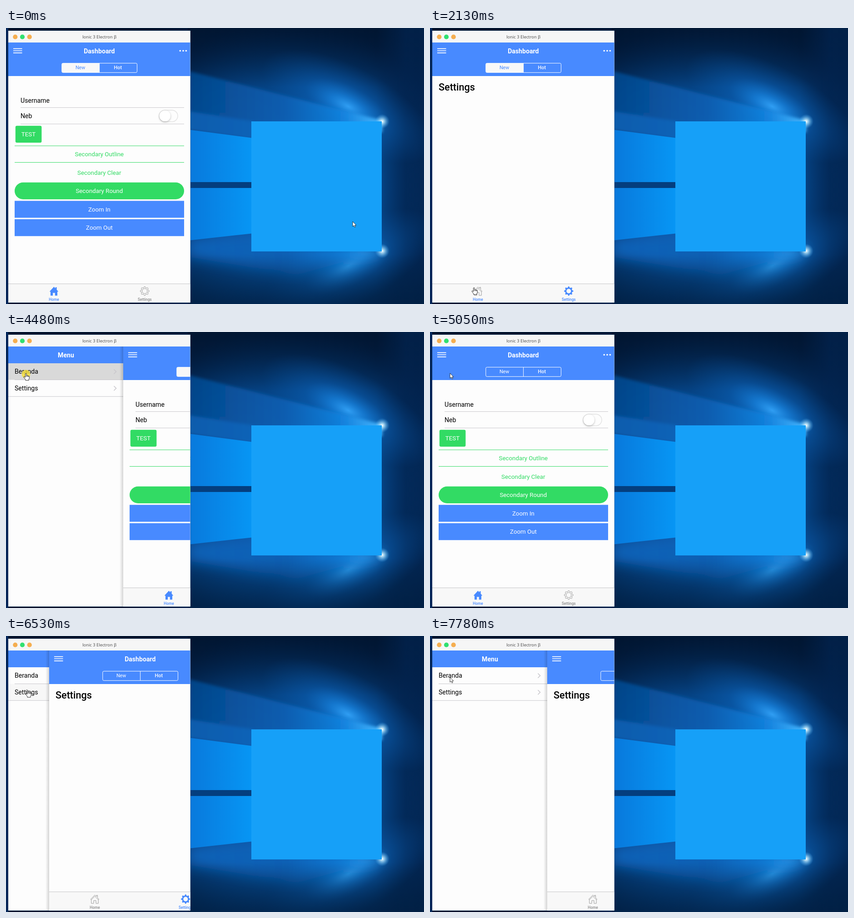
These frames come from a looping animation (920 by 609 pixels, 8000 ms). An HTML page:

```html
<!DOCTYPE html>
<html lang="en">
<head>
<meta charset="utf-8">
<title>Dashboard demo</title>
<style>
html, body { margin: 0; width: 100%; height: 100%; overflow: hidden; background: #001a38; }
svg { display: block; width: 100vw; height: 100vh; }
text { font: 14.1px Roboto, sans-serif; fill: #000; white-space: pre; }
.mid { text-anchor: middle; }
.title { font-weight: 700; fill: #fff; }
.btn { font-size: 13.3px; fill: #fff; text-anchor: middle; }
.seg { font-size: 10.8px; text-anchor: middle; }
.tab { font-size: 8.3px; font-weight: 500; text-anchor: middle; }
.win { font: 9.4px "Open Sans", "Noto Sans", sans-serif; fill: #444; text-anchor: middle; }
</style>
</head>
<body>
<svg id="stage" viewBox="0 0 920 609" preserveAspectRatio="none"></svg>
<script>
const BLUE = '#488aff', GREEN = '#32db64', LINE = '#c8c7cc', GREY = '#8c8c8c';
const LOOP = 8000, MENU_W = 253;

const rect = (x, y, w, h, fill, extra = '') =>
  `<rect x="${x}" y="${y}" width="${w}" height="${h}" fill="${fill}" ${extra}/>`;
const text = (x, y, s, cls = '', extra = '') => `<text x="${x}" y="${y}" class="${cls}" ${extra}>${s}</text>`;
const line = (d, stroke, w = 1, extra = '') =>
  `<path d="${d}" fill="none" stroke="${stroke}" stroke-width="${w}" ${extra}/>`;
const poly = (points, fill, extra = '') => `<polygon points="${points}" fill="${fill}" ${extra}/>`;
const stops = list => list.map(([o, c, a = 1]) =>
  `<stop offset="${o}" stop-color="${c}" stop-opacity="${a}"/>`).join('');
const linear = (id, x1, y1, x2, y2, list) =>
  `<linearGradient id="${id}" gradientUnits="userSpaceOnUse" x1="${x1}" y1="${y1}" x2="${x2}" y2="${y2}">${stops(list)}</linearGradient>`;
const radial = (id, cx, cy, r, list) =>
  `<radialGradient id="${id}" gradientUnits="userSpaceOnUse" cx="${cx}" cy="${cy}" r="${r}">${stops(list)}</radialGradient>`;

function gear(cx, cy, teeth, inner, outer) {
  const pts = [];
  for (let i = 0; i < teeth * 4; i++) {
    const a = (i - 1.5) / (teeth * 4) * 2 * Math.PI - Math.PI / 2;
    const r = i % 4 === 1 || i % 4 === 2 ? outer : inner;
    pts.push((cx + r * Math.cos(a)).toFixed(2) + ' ' + (cy + r * Math.sin(a)).toFixed(2));
  }
  return 'M' + pts.join('L') + 'Z';
}

const ring = (cx, cy, r) => `M${cx - r} ${cy}a${r} ${r} 0 1 0 ${2 * r} 0a${r} ${r} 0 1 0 ${-2 * r} 0Z`;

const defs = `<defs>
  ${radial('sky', 620, 350, 460, [[0, '#0764be'], [.4, '#064c94'], [.6, '#04376f'], [.8, '#021f45'], [1, '#01142d']])}
  ${linear('upper', 400, 0, 828, 0, [[0, '#074a92', .8], [.5, '#0a60b4', .85], [.8, '#1484e0', .9], [1, '#48b8ff']])}
  ${linear('lower', 400, 0, 828, 0, [[0, '#0a68c2', .85], [.5, '#0862b8', .8], [.8, '#1080dc', .85], [1, '#48b8ff']])}
  ${linear('beam', 405, 0, 550, 0, [[0, '#0879dc'], [1, '#0798f6']])}
  ${linear('right', 815, 0, 880, 0, [[0, '#022450', 0], [1, '#022450', .75]])}
  ${linear('top', 0, 0, 0, 130, [[0, '#01142e', .8], [1, '#01142e', 0]])}
  ${linear('low', 0, 500, 0, 609, [[0, '#01203f', 0], [1, '#011f42', .7]])}
  ${radial('glow', 0, 0, 210, [[0, '#34a8ff', .9], [.2, '#1a8cec', .7], [.5, '#0e6cc8', .35], [1, '#0a58a8', 0]])}
  ${radial('spark', 0, 0, 16, [[0, '#fff'], [.25, '#c8f0ff', .8], [1, '#50b8ff', 0]])}
  <filter id="soft" x="-10%" y="-10%" width="120%" height="120%"><feGaussianBlur stdDeviation="3"/></filter>
  <filter id="blur" x="-20%" y="-20%" width="140%" height="140%"><feGaussianBlur stdDeviation="14"/></filter>
  <filter id="shade" x="-30%" y="-30%" width="160%" height="170%"><feDropShadow dx="0" dy="1.5" stdDeviation="2" flood-opacity=".28"/></filter>
  ${linear('edge', -3, 0, 5, 0, [[0, '#000', 0], [1, '#000', .16]])}
  <clipPath id="view"><rect x="5" y="32" width="400.5" height="573.5"/></clipPath>
</defs>`;

const glow = (x, y, turn) =>
  `<circle r="210" fill="url(#glow)" transform="translate(${x} ${y}) rotate(${turn}) translate(-70) scale(1 .42)"/>`;

const wallpaper = rect(0, 0, 920, 609, 'url(#sky)') +
  rect(400, 0, 520, 130, 'url(#top)') +
  rect(815, 0, 105, 609, 'url(#right)') +
  glow(815, 206, 28) + glow(815, 492, -28) +
  `<g filter="url(#blur)">` +
  poly('400,465 545,450 828,492 640,545 400,505', 'url(#lower)') + `</g>` +
  `<g filter="url(#soft)">` +
  poly('390,92 828,204 828,230 545,245 390,222', 'url(#upper)') +
  poly('390,182 545,206 545,245 390,224', '#0a6ac2', 'opacity=".6"') + `</g>` +
  poly('400,224 545,243 545,343 400,340', 'url(#beam)') +
  poly('400,353 545,351 545,453 400,469', 'url(#beam)') +
  rect(400, 340, 145, 13, '#043e7e') +
  rect(400, 500, 520, 109, 'url(#low)') +
  [206, 492].map(y => `<circle r="16" fill="url(#spark)" transform="translate(828 ${y})"/>`).join('') +
  rect(540, 206, 287, 287, '#16a0f8');

const frame = rect(0, 0, 5, 609, '#03265a') + rect(4, 5, 402.5, 602, '#0a2c58', 'opacity=".5"') +
  rect(5, 6, 400.5, 599.5, '#fdfdfd') + rect(5, 6, 400.5, 26, '#f6f6f6') +
  ['#f5ae50', '#30e070', '#f5ae50'].map((c, i) => `<circle cx="${20.3 + i * 15.7}" cy="19.7" r="5.1" fill="${c}"/>`).join('') +
  text(205.5, 23.2, 'Ionic 3 Electron β', 'win');

const menuRow = (id, y, label) => rect(5, y, 254, 36.5, '#d9d9d9', `id="${id}"`) +
  text(19, y + 23, label) + line(`M237.5 ${y + 13.5}l5 5l-5 5`, LINE, 1.6);

const menu = rect(5, 32, 254, 574, '#fdfdfd') + rect(5, 32, 254, 37, BLUE) +
  text(132, 56, 'Menu', 'title mid') +
  menuRow('rowHome', 69, 'Beranda') + menuRow('rowSettings', 105.7, 'Settings') +
  line('M19 105.5H259M5 142.3H259', LINE);

const header = rect(5, 32, 401, 74, BLUE) +
  line('M16 45.6H35.5M16 50.2H35.5M16 54.9H35.5', '#fff', 1.6) +
  [383.3, 390, 396.4].map(x => `<circle cx="${x}" cy="50.3" r="1.8" fill="#fff"/>`).join('') +
  text(205.3, 56, 'Dashboard', 'title mid') +
  rect(206, 78, 82.5, 20, '#fff', 'id="hotBg" opacity=".12"') +
  rect(123, 78, 82.8, 20, '#f8f8f8', 'id="newBg"') +
  rect(122.8, 77.7, 165.7, 20.6, 'none', 'rx="2.6" stroke="#fff"') + line('M205.6 78V98', '#fff') +
  text(163.7, 91.4, 'New', 'seg', 'id="newText"') +
  text(246.3, 91.4, 'Hot', 'seg', 'style="fill:#fff;font-weight:500"');

const zoomButton = (y, label) => rect(19, y, 373, 37.3, BLUE) + text(205.5, y + 23.4, label, 'btn');

const home = text(32, 164.5, 'Username') + text(32, 198.6, 'Neb') +
  line('M32 175.6H392M32 211.8H392', LINE) +
  rect(337, 181.4, 41, 25.4, '#fdfdfd', 'rx="12.7" stroke="#e4e4e4" stroke-width="1.6"') +
  `<circle cx="349.8" cy="194" r="12" fill="#fff" filter="url(#shade)"/>` +
  rect(20.8, 215.8, 57.6, 37.2, GREEN, 'rx="3.2"') + text(49.5, 239, 'TEST', 'btn') +
  line('M19 260H392M19 296.6H392', GREEN) +
  text(205.3, 283, 'Secondary Outline', 'btn', `style="fill:${GREEN}"`) +
  text(205.3, 323.6, 'Secondary Clear', 'btn', `style="fill:${GREEN}"`) +
  rect(19, 340.8, 373, 37.2, GREEN, 'rx="18.6"') + text(205.3, 364, 'Secondary Round', 'btn') +
  zoomButton(381.4, 'Zoom In') + zoomButton(421.9, 'Zoom Out');

const settings = text(19, 137.8, 'Settings', '', 'style="font-size:21.6px;font-weight:500"');

const houseOn = `<path fill="${BLUE}" d="M96 581.2L105.5 571L108.8 574.4V572H111.6V577.4L115 581.2L113.8 582.2L113 581.4V590.4H107.8V584.4H103.2V590.4H98V581.4L97.2 582.2Z"/>`;
const houseOff = line('M96.3 581L105.5 571.5L109 575V572.2H111.5V577.6L114.7 581L113.2 582V590H108V583.8H103V590H97.8V582ZM97.8 582L105.5 574.2L113.2 582', GREY, .85);
const gearOn = `<path fill="${BLUE}" fill-rule="evenodd" d="${gear(305.3, 580.5, 8, 7.8, 10.2)}${ring(305.3, 580.5, 5)}"/>`;
const gearOff = line(gear(305.3, 580.5, 8, 7.6, 9.8) + ring(305.3, 580.5, 5.6), GREY, .85);

const tabs = rect(5, 564.5, 401, 41.5, '#f8f8f8') + line('M5 564.5H406', '#c4c4c6') +
  `<g id="houseOn">${houseOn}</g><g id="houseOff">${houseOff}</g>` +
  `<g id="gearOn">${gearOn}</g><g id="gearOff">${gearOff}</g>` +
  text(105.5, 602, 'Home', 'tab', 'id="homeTab"') + text(305.3, 602, 'Settings', 'tab', 'id="settingsTab"');

const cursor = `<g id="cursor"><circle id="press" cx="0" cy="2" r="9.5" fill="#f7e032" opacity=".78"/>
  <path id="arrow" d="M0 0V11L2.6 8.7L4.4 12.6L6.2 11.8L4.5 8.1H7.8Z" fill="#fff" stroke="#111" stroke-width=".8"/>
  <path id="hand" d="M-1.5 1.2Q-.2 -.6 1.1 1.2V5Q2.4 4.2 3.4 5.5Q4.7 4.7 5.5 6.1Q7.3 5.7 7.3 7.6V10.4Q7.2 12.4 6 13.6V15.7H-1V13.9L-4.6 9.2Q-5.4 7.6 -3.8 7.3L-1.5 9ZM1.1 5V8M3.4 5.5V8M5.5 6.1V8.2" fill="#fff" stroke="#111" stroke-width=".9" stroke-linejoin="round"/></g>`;

document.getElementById('stage').innerHTML = defs + wallpaper + frame +
  `<g clip-path="url(#view)"><g id="menu">${menu}</g><g id="page">
    ${rect(-3, 32, 8, 574, 'url(#edge)', 'id="shadow"')}${rect(5, 32, 401, 574, '#fdfdfd')}${header}
    <g id="home">${home}</g><g id="settings">${settings}</g>${tabs}</g></g>` + cursor;

const el = {};
document.querySelectorAll('#stage [id]').forEach(n => el[n.id] = n);

// Cursor moves: start, end, x, y and an optional control point.
const moves = [
  [20, 20, 698, 316], [210, 950, 272, 582, 420, 665], [1370, 1800, 97, 572.5, 180, 578],
  [2490, 3270, 48, 48, 485, 40], [3300, 3420, 30.5, 46], [3640, 4090, 44, 91],
  [5050, 5200, 30.5, 50], [5560, 5730, 35, 95.5], [5880, 6110, 48, 119.5],
  [6850, 7030, 33, 51.5], [7560, 7780, 44, 91]
];
const hands = [[860, 2580], [3290, 3680], [4120, 4620], [5130, 6880], [6990, 7580]];
const presses = [[1050, 1120], [2060, 2130], [3350, 3430], [4380, 4510], [5360, 5450], [6190, 6290], [7380, 7440]];
const opens = [[3560, 4590], [5530, 6366], [7400, Infinity]];

const clamp = v => Math.max(0, Math.min(1, v));
const during = (list, t) => list.some(([a, b]) => t >= a && t < b);
const show = (node, on) => node.setAttribute('visibility', on ? 'inherit' : 'hidden');

function bezier(x1, y1, x2, y2, x) {
  const at = (a, b, s) => 3 * a * s * (1 - s) ** 2 + 3 * b * s * s * (1 - s) + s ** 3;
  let lo = 0, hi = 1;
  for (let i = 0; i < 20; i++) {
    const m = (lo + hi) / 2;
    if (at(x1, x2, m) < x) lo = m; else hi = m;
  }
  return at(y1, y2, (lo + hi) / 2);
}

function cursorAt(t) {
  let x = 763, y = 427;
  for (const [t0, t1, ex, ey, cx = (x + ex) / 2, cy = (y + ey) / 2] of moves) {
    if (t < t0) break;
    const p = t1 > t0 ? clamp((t - t0) / (t1 - t0)) : 1;
    const s = p * p * (3 - 2 * p), q = 1 - s;
    x = q * q * x + 2 * q * s * cx + s * s * ex;
    y = q * q * y + 2 * q * s * cy + s * s * ey;
  }
  return [x, y];
}

// Whole pixels keep the sliding text crisp.
function menuOffset(t) {
  const cur = opens.filter(([a]) => t >= a).pop();
  if (!cur) return 0;
  const [a, b] = cur;
  const open = t < b ? bezier(0, 0, .2, 1, clamp((t - a) / 280)) : 1 - bezier(.4, 0, .6, 1, clamp((t - b) / 280));
  return Math.round(MENU_W * open);
}

const highlight = (t, on, off) => t < on ? 0 : 1 - clamp((t - off) / 200);

function draw(t) {
  const [x, y] = cursorAt(t), off = menuOffset(t);
  const onSettings = (t >= 1190 && t < 2170) || t >= 6350;
  const fresh = t >= 4560;
  const overTabs = y > 565 && x < 405, hand = during(hands, t);

  el.page.setAttribute('transform', `translate(${off})`);
  show(el.menu, off > 0);
  show(el.shadow, off > 0);
  el.rowHome.setAttribute('opacity', highlight(t, 4380, 4590));
  el.rowSettings.setAttribute('opacity', highlight(t, 6190, 6366));

  show(el.home, !onSettings);
  show(el.settings, onSettings);
  show(el.houseOn, !onSettings);
  show(el.houseOff, onSettings);
  show(el.gearOn, onSettings);
  show(el.gearOff, !onSettings);
  el.homeTab.style.fill = !onSettings || (overTabs && x < 205) ? BLUE : GREY;
  el.settingsTab.style.fill = onSettings || (overTabs && x >= 205) ? BLUE : GREY;

  show(el.newBg, !fresh);
  el.newText.style.fill = fresh ? '#fff' : BLUE;
  show(el.hotBg, x > 205 && x < 288 && y > 77 && y < 98);

  el.cursor.setAttribute('transform', `translate(${x.toFixed(2)} ${y.toFixed(2)})`);
  show(el.arrow, !hand);
  show(el.hand, hand);
  show(el.press, during(presses, t));
}

function tick() {
  draw(performance.now() % LOOP);
  requestAnimationFrame(tick);
}
tick();
</script>
</body>
</html>
```
